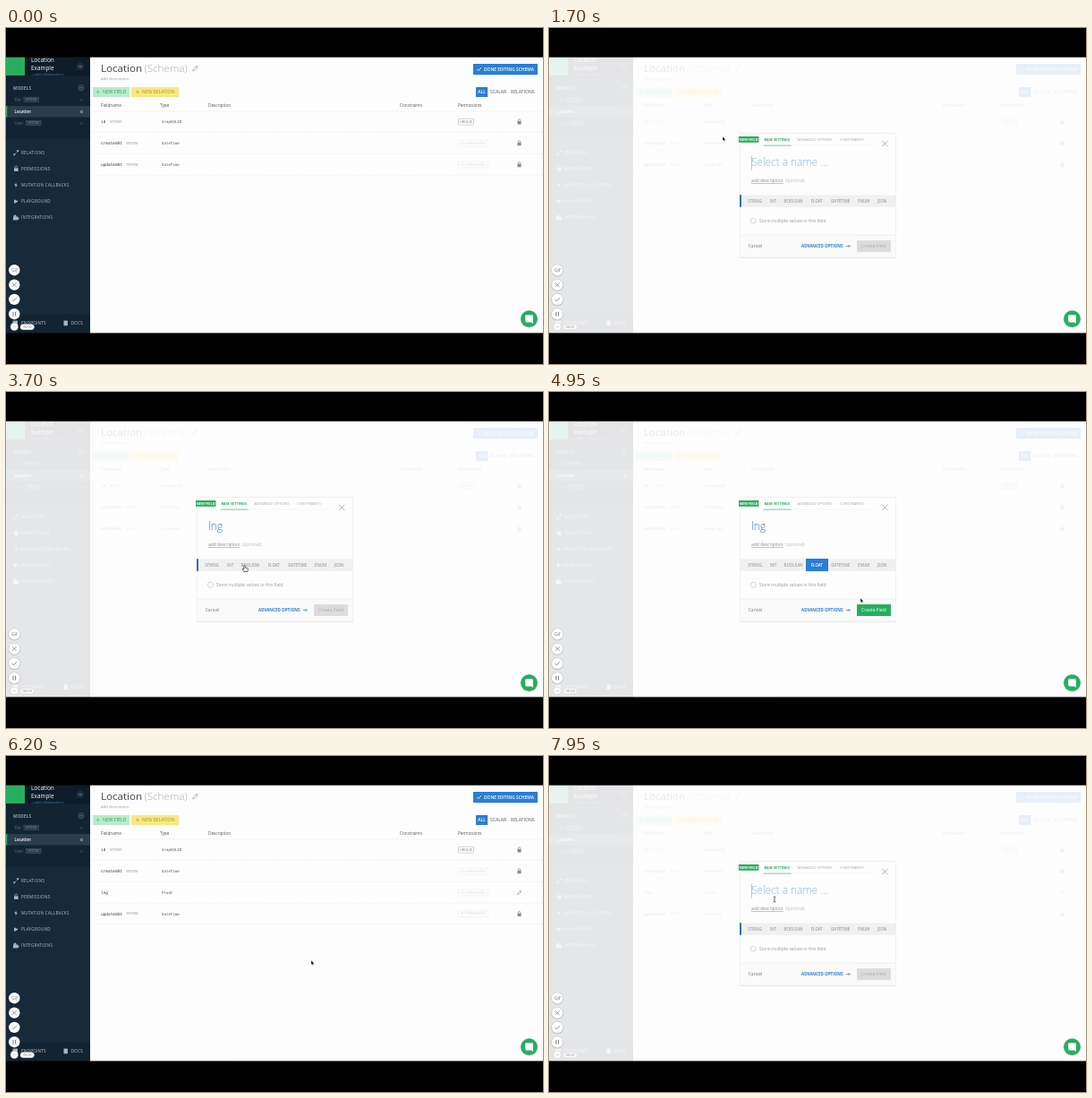
An HTML page for the animation above (8 s loop, 600 by 375 pixels).

```html
<!DOCTYPE html>
<html lang="en">
<head>
<meta charset="utf-8">
<title>Schema editor</title>
<style>
html, body { margin: 0; width: 100%; height: 100%; overflow: hidden; background: #000; }
svg { display: block; width: 100vw; height: 100vh; font-family: "Open Sans", sans-serif; }
.mono { font-family: "DejaVu Sans Mono", monospace; }
text { white-space: pre; }
</style>
</head>
<body>
<svg id="stage" viewBox="0 0 600 375" xmlns="http://www.w3.org/2000/svg"></svg>
<script>
const LOOP = 8000, STEP = 50;
const BLUE = '#2a7ed2', GREEN = '#27ae60', NAVY = '#172a3a';

const text = (x, y, s, size, fill, extra = '') =>
  `<text x="${x}" y="${y}" font-size="${size}" fill="${fill}" ${extra}>${s}</text>`;
const rect = (x, y, w, h, fill, extra = '') =>
  `<rect x="${x}" y="${y}" width="${w}" height="${h}" fill="${fill}" ${extra}/>`;
const path = (d, stroke, width = 0.7, extra = '') =>
  `<path d="${d}" fill="none" stroke="${stroke}" stroke-width="${width}" ${extra}/>`;
const shape = (d, fill) => `<path d="${d}" fill="${fill}"/>`;
const circle = (x, y, r, fill, extra = '') =>
  `<circle cx="${x}" cy="${y}" r="${r}" fill="${fill}" ${extra}/>`;
const group = (id, body, extra = '') => `<g id="${id}" ${extra}>${body}</g>`;

const SEMI = 'font-weight="600"', BOLD = 'font-weight="700"', LIGHT = 'font-weight="300"';
const MONO = 'class="mono"', MID = 'text-anchor="middle"';

function pencil(x, y, k, color) {
  return `<g transform="translate(${x} ${y}) scale(${k})">` +
    path('M-3 3L-2.4 0.8L1.6 -3.2L3.2 -1.6L-0.8 2.4ZM0.6 -2.2L2.2 -0.6', color, 0.8) + '</g>';
}

function lock(x, y) {
  return rect(x - 2, y - 0.6, 4, 3.4, '#8b8b8b', 'rx="0.5"') +
    path(`M${x - 1.2} ${y - 0.5}v-1a1.2 1.2 0 0 1 2.4 0v1`, '#8b8b8b', 0.8);
}

function modelRow(y, name) {
  const x = name === 'File' ? 20 : 22.5;
  return text(9.5, y + 1.6, name, 4.5, '#5f707d') +
    rect(x, y - 2.3, 16.5, 4.8, '#26394a', 'stroke="#506270" stroke-width="0.5"') +
    text(x + 8.2, y + 1.4, 'SYSTEM', 3.4, '#8695a0', MID) +
    text(84.5, y + 1.6, '0', 4.3, '#5f707d', MID);
}

function sidebar() {
  const c = '#a9b4bc';
  const item = (y, s) => text(17, y + 1.8, s, 4.6, '#b6c0c7', 'letter-spacing="0.27"');
  return rect(0, 32, 94, 309, NAVY) +
    rect(0, 32, 94, 92, '#122331') +
    rect(21, 32, 73, 21, '#0e1c28') +
    rect(0, 32, 21, 21, GREEN) +
    text(28, 37.6, 'Location', 6.5, '#fff') +
    text(28, 47, 'Example', 6.4, '#fff') +
    text(28.5, 53.4, '+ add collaborators', 4, '#2f80b8') +
    circle(83, 43, 4, '#1d303f') +
    path('M81.6 42.4L83 43.8L84.4 42.4', '#c9d2d8', 0.6) +
    text(8, 68.7, 'MODELS', 4.6, '#b6c0c7', SEMI + ' letter-spacing="0.25"') +
    circle(84, 66.7, 2.9, 'none', 'stroke="#8796a1" stroke-width="0.5"') +
    path('M82.4 66.7h3.2M84 65.1v3.2', '#8796a1', 0.5) +
    modelRow(80, 'File') +
    rect(0, 87, 94, 12.5, '#2b3d4d') + rect(0, 87, 1.3, 12.5, GREEN) +
    text(9.5, 95, 'Location', 4.4, '#fff', SEMI) +
    text(84.5, 95, '0', 4.3, '#fff', MID + ' ' + SEMI) +
    modelRow(106, 'User') +
    item(139.2, 'RELATIONS') + item(157.2, 'PERMISSIONS') +
    item(175.4, 'MUTATION CALLBACKS') + item(193.6, 'PLAYGROUND') +
    item(211.6, 'INTEGRATIONS') +
    path('M9.3 141.5l4-4.4', c, 0.6) + circle(9.3, 141.3, 1.1, c) + circle(13.2, 137.2, 1.1, c) +
    rect(9, 156.3, 4.6, 3.6, c) + path('M10 156.4v-1.2a1.3 1.3 0 0 1 2.6 0v1.2', c, 0.7) +
    shape('M11.6 172.2L9.2 176H11L10.2 178.8L13 174.8H11.2Z', c) +
    shape('M9 191.2L13.8 193.6L9 196Z', c) +
    rect(8, 210.4, 5.2, 4, c) + circle(10, 209.8, 1.4, c) + circle(13.4, 212.6, 1.2, c) +
    rect(0, 319.5, 94, 21.5, '#122331') +
    text(17, 331.3, 'ENDPOINTS', 4.7, '#c4ccd2', 'letter-spacing="0.2"') +
    text(72.5, 331.3, 'DOCS', 4.7, '#c4ccd2', 'letter-spacing="0.2"') +
    rect(64.5, 326.6, 4.4, 5.6, c) + rect(7.5, 326.6, 5.5, 5, c);
}

function fieldRow(y, name, type, sys, unique) {
  const line = path(`M97 ${y + 11.7}H600`, '#e4e4e4', 0.6, 'stroke-dasharray="2 1"');
  const sx = name === 'id' ? 116 : 134.5;
  const perm = unique
    ? rect(505.5, y - 3.3, 17, 6.8, '#fff', 'stroke="#b5b5b5" stroke-width="0.6" rx="0.6"') +
      text(514, y + 1.3, 'UNIQUE', 3.6, '#777', MID)
    : rect(505.5, y - 3.3, 33, 6.8, '#fff', 'stroke="#e8e8e8" stroke-width="0.6" rx="0.6"') +
      text(522, y + 1.3, 'NO PERMISSIONS', 3.4, '#d6d6d6', MID);
  return text(106, y + 1.6, name, 4.45, '#333', MONO) +
    (sys ? text(sx, y + 1.2, 'SYSTEM', 3.4, '#888') : '') +
    text(174, y + 1.5, type, 4.1, '#555', MONO) + perm +
    (sys ? lock(573.5, y) : pencil(573.5, y, 0.7, '#8b8b8b')) + line;
}

function schema() {
  const head = (x, s) => text(x, 88.2, s, 4.7, '#555');
  return rect(94, 32, 506, 309, '#fefdfe') +
    text(106, 49.2, 'Location', 11.6, '#444') +
    text(154.5, 49.2, '(Schema)', 11.7, '#aaa', LIGHT) +
    pencil(211.5, 45, 0.95, '#aaa') +
    text(106, 58.4, 'Add description', 4.25, '#999') +
    rect(522, 40, 72, 12.3, BLUE, 'rx="0.8"') +
    path('M526.3 46l1.6 1.6L530.8 44.3', '#fff', 0.9) +
    text(534, 48, 'DONE EDITING SCHEMA', 4.9, '#fff', SEMI) +
    rect(97, 66, 41, 11, '#b9ebcb') + path('M100.5 71.4h4M102.5 69.4v4', '#55bd80', 0.7) +
    text(108, 73.3, 'NEW FIELD', 5.15, '#2aa65d') +
    rect(140, 66, 53, 11, '#f9e882') + path('M145 71.4h4M147 69.4v4', '#c2a73a', 0.7) +
    text(152, 73.3, 'NEW RELATION', 5.15, '#ab922e') +
    rect(525, 66, 13.2, 11, BLUE) +
    text(531.6, 73.2, 'ALL', 5, '#fff', MID + ' ' + SEMI) +
    text(541, 73.2, 'SCALAR', 5.05, '#555') +
    text(564, 73.2, 'RELATIONS', 5.15, '#555') +
    head(106, 'Fieldname') + head(172, 'Type') + head(226, 'Description') +
    head(440, 'Constraints') + head(505, 'Permissions') +
    path('M97 93H600', '#eee', 0.6) +
    fieldRow(104.6, 'id', 'GraphQLID', true, true) +
    fieldRow(128.5, 'createdAt', 'DateTime', true) +
    group('added', fieldRow(152.4, 'lng', 'Float', false)) +
    group('last', fieldRow(152.4, 'updatedAt', 'DateTime', true));
}

function modal() {
  const types = [[230, 'STRING'], [250.5, 'INT'], [273, 'BOOLEAN'], [299.3, 'FLOAT'],
    [325.7, 'DATETIME'], [351.7, 'ENUM'], [372, 'JSON']];
  return rect(0, 32, 600, 309, '#fefdfe', 'opacity="0.89"') +
    rect(213.5, 117.5, 174, 138.5, '#fefdfe', 'stroke="#ebebeb" stroke-width="0.7"') +
    path('M213.5 256.2H387.5', '#dedede', 0.8) +
    path('M241 131H362', '#ededed', 0.6) +
    rect(212, 121, 22.4, 6.8, GREEN) +
    text(223.2, 126, 'NEW FIELD', 3.9, '#fff', MID + ' ' + BOLD) +
    text(240.5, 125.8, 'BASE SETTINGS', 3.85, GREEN, BOLD) +
    rect(239.5, 130.7, 31, 0.8, '#5cc388') +
    text(277.5, 125.8, 'ADVANCED OPTIONS', 4, '#aaa') +
    text(325, 125.8, 'CONSTRAINTS', 4.05, '#aaa') +
    path('M372 125.8l6.4 6.4M378.4 125.8l-6.4 6.4', '#999', 0.7) +
    text(226, 154.3, '', 11.8, BLUE, LIGHT + ' id="name"') +
    rect(226, 142.5, 0.5, 16, '#888', 'id="caret"') +
    text(226, 172.3, 'add description', 4.9, '#888', 'text-decoration="underline" text-decoration-thickness="0.3"') +
    text(264, 172.3, '(optional)', 4.8, '#bbb') +
    rect(213.5, 186.5, 174, 13.2, '#f0f0f0') +
    rect(213, 186.2, 2, 13.6, '#2f70b4', 'id="bar"') +
    rect(287, 186, 25, 14, BLUE, 'id="pick"') +
    types.map(([x, s]) => text(x, 194.8, s, 4.4, '#a0a0a0', `${MID} ${SEMI} id="type${s}"`)).join('') +
    circle(228.4, 215.2, 3, '#fff', 'stroke="#bbb" stroke-width="0.6"') +
    text(234.8, 217, 'Store multiple values in this field', 4.95, '#999') +
    rect(213.9, 231, 173.2, 24.6, '#fafafa') + path('M214 231H387', '#e6e6e6', 0.6) +
    text(222.7, 245, 'Cancel', 5.05, '#777') +
    text(282, 245, 'ADVANCED OPTIONS', 4.55, BLUE, BOLD) +
    path('M332 243.4h4.2M334.7 241.9l1.5 1.5l-1.5 1.5', BLUE, 0.7) +
    rect(344, 237, 38, 13, '#dcdcdc', 'id="create"') +
    text(363, 245.2, 'Create Field', 5.05, '#aaa', MID + ' id="createLabel"');
}

function recorder() {
  const c = '#666';
  return [270.2, 286.6, 302.9, 319.2].map(y =>
      circle(9.3, y + 0.3, 7, '#000', 'opacity="0.14"') + circle(9.3, y, 6.2, '#fff')).join('') +
    text(9.3, 272, 'Gif', 5, c, MID) +
    path('M7 284.3l4.6 4.6M11.6 284.3l-4.6 4.6', c, 0.7) +
    path('M6.7 303l1.8 1.8L12 301.2', c, 0.8) +
    path('M8 316.8v4.8M10.6 316.8v4.8', c, 0.9) +
    circle(9.3, 333.4, 4.1, '#fff', 'stroke="#ccc" stroke-width="0.5"') +
    path('M7.6 333.4h3.4', '#aaa', 0.6) +
    rect(16, 330.7, 15.4, 6, '#fff', 'rx="3" stroke="#ccc" stroke-width="0.5"') +
    text(23.7, 335.3, '', 4, '#777', MID + ' id="clock"');
}

function chat() {
  return circle(584.5, 325, 10, '#000', 'opacity="0.1"') +
    circle(584.5, 324.6, 9.4, GREEN) +
    rect(580.2, 320.2, 8.6, 8.2, '#fff', 'rx="1.3"') + shape('M586 327.4L588.8 330V326Z', '#fff');
}

function pointers() {
  const hand = 'M-0.7 0.4C-0.7 -0.4 0.7 -0.4 0.7 0.4V2.5L3.4 3.2C4 3.5 4 4.2 3.8 5L3.2 7H-0.6L-2.4 4.3C-2.6 3.6 -1.6 3.4 -0.7 4.3Z';
  return group('arrow', '<path d="M0 0V5L1.1 4L1.9 5.8L2.8 5.4L2 3.7H3.5Z" stroke="#fff" stroke-width="0.4"/>') +
    group('hand', `<path d="${hand}" fill="#fff" stroke="#222" stroke-width="0.7"/>`) +
    group('beam', path('M-1.3 -3Q0 -3 0 -2.2Q0 -3 1.3 -3M0 -2.2V2.2M-1.3 3Q0 3 0 2.2Q0 3 1.3 3', '#222', 0.7));
}

document.getElementById('stage').innerHTML =
  rect(0, 0, 600, 375, '#000') + schema() + sidebar() + group('modal', modal()) +
  recorder() + chat() + group('cursor', pointers()) +
  rect(0, 0, 600, 32.7, '#000') + rect(0, 340.4, 600, 35, '#000');

// time, x, y of the pointer tip
const MOVES = [
  [50, 62, 285], [750, 133.5, 71], [1300, 133.5, 71], [1700, 194, 121], [2050, 250, 161],
  [3150, 250, 161], [3700, 266.5, 193.5], [4100, 299, 193], [4450, 299, 193],
  [4950, 348, 230], [5250, 357, 240], [6050, 350, 236], [6200, 341, 228],
  [7100, 133.5, 70.5], [7400, 133.5, 70.5], [7800, 252, 160], [8000, 252, 160]
];
const SHAPES = [[0, 'arrow'], [650, 'hand'], [1050, 'arrow'], [1950, 'beam'], [3550, 'hand'],
  [4600, 'arrow'], [5100, 'hand'], [6050, 'arrow'], [7000, 'hand'], [7350, 'arrow'], [7700, 'beam']];
const TYPED = [[0, ''], [2550, 'l'], [2700, 'ln'], [2900, 'lng'], [6500, '']];
const PICKED = 4150, SAVED = 5950;

const at = (list, t) => list.filter(k => k[0] <= t).pop()[1];
const ramp = (t, a, b) => Math.min(1, Math.max(0, (t - a) / (b - a)));
const slope = (i, axis) =>
  (MOVES[i + 1][axis] - MOVES[i][axis]) / (MOVES[i + 1][0] - MOVES[i][0]);

// Smooth through moving keys, at rest where the pointer stops or turns.
function tangent(i, axis) {
  if (i === 0 || i === MOVES.length - 1) return 0;
  const a = slope(i - 1, axis), b = slope(i, axis);
  return a * b <= 0 ? 0 : 2 * a * b / (a + b);
}

function along(t, axis) {
  let i = 0;
  while (i < MOVES.length - 2 && MOVES[i + 1][0] <= t) i++;
  const [a, b] = [MOVES[i], MOVES[i + 1]];
  const d = b[0] - a[0], u = ramp(t, a[0], b[0]), v = 1 - u;
  return a[axis] * (1 + 2 * u) * v * v + b[axis] * u * u * (3 - 2 * u) +
    d * u * v * (tangent(i, axis) * v - tangent(i + 1, axis) * u);
}

const $ = id => document.getElementById(id);
const set = (id, name, value) => $(id).setAttribute(name, value);
const show = (id, on) => set(id, 'visibility', on ? 'inherit' : 'hidden');

function draw(t) {
  const open = ramp(t, 950, 1150) - ramp(t, SAVED, SAVED + 200) + ramp(t, 7200, 7400);
  set('modal', 'opacity', open);
  show('modal', open > 0);

  const name = at(TYPED, t);
  $('name').textContent = name || 'Select a name ...';
  set('name', 'fill', name ? BLUE : '#86b8de');
  show('caret', !name);

  const picked = t >= PICKED && t < 6500;
  show('pick', picked);
  show('bar', !picked);
  set('typeFLOAT', 'fill', picked ? '#fff' : '#a0a0a0');
  set('create', 'fill', picked ? GREEN : '#dcdcdc');
  set('createLabel', 'fill', picked ? '#fff' : '#aaa');

  const saved = t >= SAVED;
  show('added', saved);
  set('last', 'transform', `translate(0 ${saved ? 23.8 : 0})`);

  show('cursor', t >= 50);
  set('cursor', 'transform', `translate(${along(t, 1)} ${along(t, 2)})`);
  const kind = at(SHAPES, t);
  for (const id of ['arrow', 'hand', 'beam']) show(id, id === kind);
  $('clock').textContent = '00:0' + Math.floor(t / 1000);
}

function tick() {
  const t = performance.now() % LOOP;
  draw(Math.floor(t / STEP) * STEP);
  requestAnimationFrame(tick);
}
tick();
</script>
</body>
</html>
```
